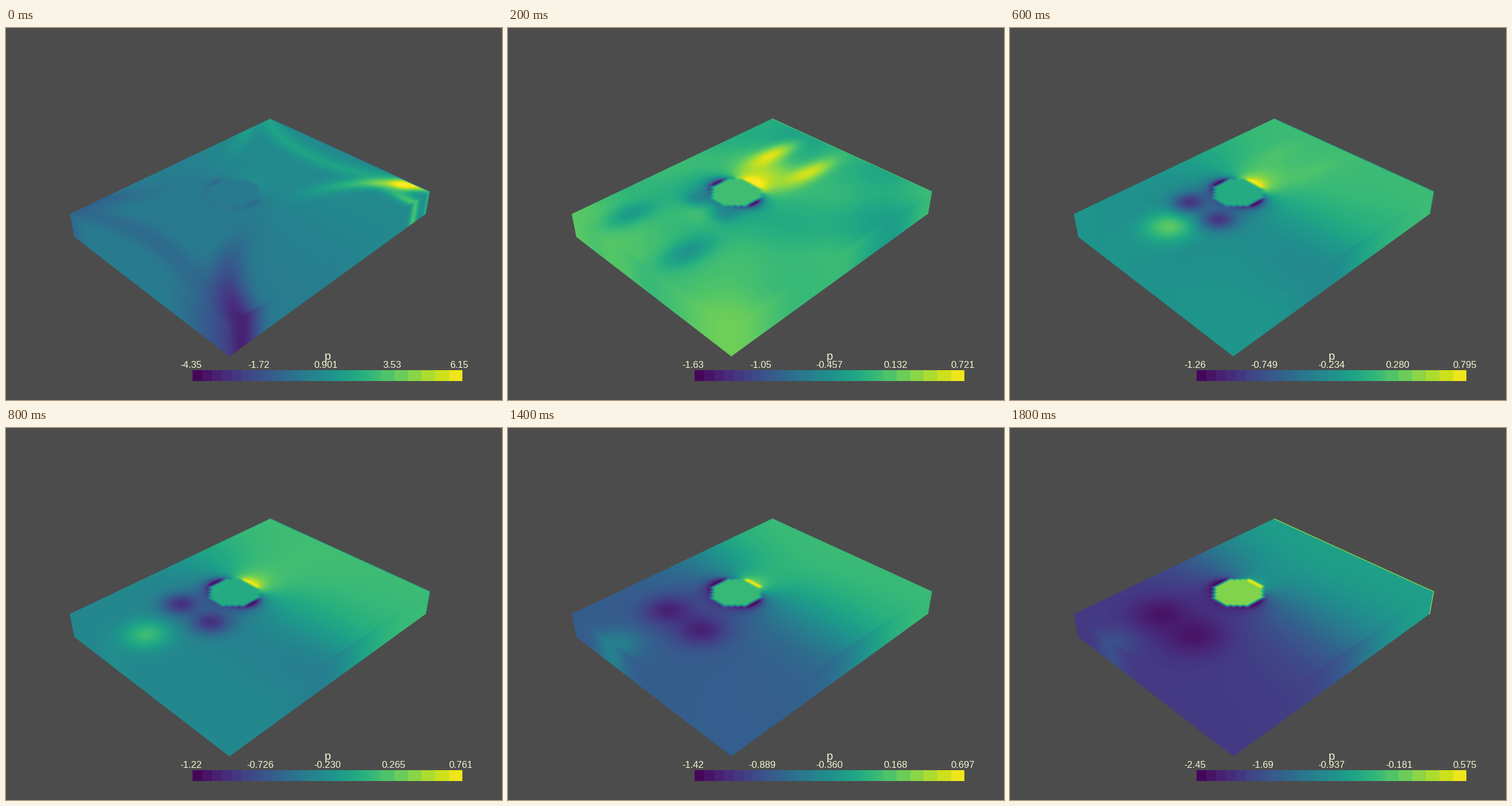
These frames come from a looping animation (864 px wide and 648 px high, 1900 ms). A matplotlib script:

```python
import numpy as np
import matplotlib.pyplot as plt
from matplotlib.animation import FuncAnimation
from matplotlib.patches import Polygon

W, H, FRAMES, STEP = 864, 648, 19, 100
VIRIDIS = plt.get_cmap("viridis")
INK = "#eff8d2"

# Corners of the slab
BACK, RIGHT, LEFT, FRONT = (460, 158), (738, 285), (111, 324), (388, 520)
LEFT_LOW, FRONT_LOW, RIGHT_LOW = (119, 364), (389, 572), (731, 324)
OUTLINE = [BACK, RIGHT, RIGHT_LOW, FRONT_LOW, LEFT_LOW, LEFT]

# Scalar range and mean levels at a few moments (in steps)
KEYS = [0, 2, 4, 6, 10, 14, 18]
LOW = [-4.348, -1.6345, -1.2725, -1.2635, -1.179, -1.4175, -2.449]
HIGH = [6.15, 0.721, 0.822, 0.795, 0.7264, 0.697, 0.575]
INLET = [0.48, 0.60, 0.66, 0.68, 0.69, 0.68, 0.57]
OUTLET = [0.42, 0.69, 0.53, 0.52, 0.42, 0.30, 0.17]

# Mesh on the top face: s runs from inlet to outlet, t across
LENGTH, CELL = 1.3, 0.02
S, T = np.meshgrid(np.arange(66) * CELL, np.arange(51) * CELL, indexing="ij")
CS, CT, R = 0.65, 0.38, 0.12


def homography(p0, p1, p2, p3):
    """Unit square (0,0),(1,0),(1,1),(0,1) to a quadrilateral."""
    p0, p1, p2, p3 = (np.array(p, float) for p in (p0, p1, p2, p3))
    g, h = np.linalg.solve(np.column_stack([p1 - p2, p3 - p2]), p0 - p1 + p2 - p3)
    cols = np.column_stack([p1 * (1 + g) - p0, p3 * (1 + h) - p0, p0])
    return np.vstack([cols, [g, h, 1]])


def unproject(quad, x, y):
    m = np.linalg.inv(homography(*quad))
    u, v, w = (row[0] * x + row[1] * y + row[2] for row in m)
    return u / w, v / w


# Every pixel is traced to its place (a, b) on the top; sides extend the rim
X0, X1, Y0, Y1 = 104, 744, 152, 580
px, py = np.meshgrid(np.arange(X0, X1) + 0.5, np.arange(Y0, Y1) + 0.5)
a, b = unproject((BACK, LEFT, FRONT, RIGHT), px, py)
on_side = (a > 1) | (b > 1)
on_left = on_side & (px < 388.5)
on_right = on_side & ~on_left
sl, _ = unproject((LEFT, FRONT, FRONT_LOW, LEFT_LOW), px, py)
sr, _ = unproject((FRONT, RIGHT, RIGHT_LOW, FRONT_LOW), px, py)
a = np.clip(np.where(on_left, 1, np.where(on_right, 1 - sr, a)), 0, 1)
b = np.clip(np.where(on_right, 1, np.where(on_left, sl, b)), 0, 1)

# Bilinear lookup from mesh nodes to pixels
gi, gj = a * (S.shape[0] - 1), b * (S.shape[1] - 1)
i0 = np.minimum(gi.astype(int), S.shape[0] - 2)
j0 = np.minimum(gj.astype(int), S.shape[1] - 2)
fi, fj = gi - i0, gj - j0


def to_pixels(nodes):
    near = nodes[i0, j0] * (1 - fj) + nodes[i0, j0 + 1] * fj
    far = nodes[i0 + 1, j0] * (1 - fj) + nodes[i0 + 1, j0 + 1] * fj
    return near * (1 - fi) + far * fi


def blob(s, t, ws, wt=None):
    return np.exp(-(((S - s) / ws) ** 2 + ((T - t) / (wt or ws)) ** 2) / 2)


def ring(s, t, radius, width):
    return np.exp(-((np.hypot(S - s, T - t) - radius) / width) ** 2 / 2)


def start_pulse():
    """Wave fronts thrown back by the walls: high upstream, low downstream."""
    x = (CS - S) / CS
    dipole = x * np.abs(x)
    width = 0.028 + 0.03 * S / LENGTH
    return (0.40 * dipole * ring(0.6, 1.29, 0.695, width)
            + 0.20 * dipole * ring(0.65, -0.62, 0.77, width)
            + 0.10 * ring(-0.6, 0.42, 0.745, 0.04)
            - 0.07 * ring(1.9, 0.42, 0.745, 0.05)
            + 0.22 * blob(0.05, 0.89, 0.04)
            + 0.24 * blob(0.13, 1, 0.025, 0.10))


def early_swell():
    """Twin crests ahead of the cylinder, twin troughs behind, slight unrest."""
    rng = np.random.default_rng(4)
    out = 0.14 * blob(0.4, CT, 0.1, 0.12)
    for side in (-1, 1):
        out += 0.27 * blob(0.26, CT + 0.12 * side, 0.11, 0.04)
        out -= 0.16 * blob(1.12, CT - 0.01 + 0.19 * side, 0.09, 0.05)
    for i in range(1, 5):
        for j in range(1, 5):
            wave = np.cos(i * np.pi * S / LENGTH) * np.cos(j * np.pi * T)
            out += 0.008 * rng.normal() * wave
    return out + 0.08 * blob(LENGTH, 0, 0.15) + 0.07 * blob(LENGTH, 0.9, 0.15, 0.3)


def cylinder_flow():
    """High in front, sharp lows on the flanks, a weak wake."""
    ds, dt = CS - S, T - CT
    r = np.maximum(np.hypot(ds, dt), R)
    c, q = ds / r, (R / r) ** 2
    checker = (-1.0) ** np.add.outer(np.arange(S.shape[0]), np.arange(S.shape[1]))
    return (0.42 * np.clip(c, 0, 1) ** 3 * q
            - 0.70 * (dt / r) ** 6 * q ** 3
            - 0.30 * np.clip(0.3 - c, 0, 1) * q
            + 0.015 * checker * q)


PULSE, SWELL, FLOW = start_pulse(), early_swell(), cylinder_flow()
DROP = 1 / (1 + np.exp(9 * (S / LENGTH - 0.38 - 0.08 * T)))
SOLID = np.hypot(S - CS, T - CT) < R
FACE = SOLID & (S < S[SOLID].min() + CELL / 2)


def field_at(step, zero):
    inlet, outlet = np.interp(step, KEYS, INLET), np.interp(step, KEYS, OUTLET)
    v = outlet + (inlet - outlet) * DROP
    v += PULSE * max(0, 1 - step / 2)
    v += SWELL * np.interp(step, [0, 2, 4, 8], [0, 1, 0.2, 0])
    v += FLOW * np.interp(step, [0, 2, 12, 18], [0.15, 1, 0.9, 0.5])
    v -= 0.07 * np.interp(step, [2, 5, 10, 16], [0, 1, 1, 0]) * blob(0.8, 1, 0.15, 0.22)

    # a crest runs ahead to the outlet, the vortex pair drifts after it and grows
    shed = np.clip((step - 1) / 3, 0, 1)
    crest = min(0.59 + 0.037 * step, 1) * LENGTH
    v *= 1 + 0.5 * shed * blob(crest, 0.40 - 0.006 * step, 0.075)
    drift = (0.61 + 0.0098 * step) * LENGTH
    for side in (-1, 1):
        v *= 1 - 0.68 * shed * blob(drift, CT + side * (0.085 + 0.0015 * step),
                                    0.035 + 0.0033 * step)

    v = np.where(SOLID, zero, np.clip(v, 0, 1))
    if step > 0:
        v[FACE] = 1
    return to_pixels(v)


def bar_values():
    """Smooth in the middle, stepped towards both ends."""
    t = (np.arange(470) + 0.5) / 470
    steps = np.where(t < 0.2, 0.036, np.where(t > 0.7, 0.05, 1 / 470))
    return ((np.floor(t / steps) + 0.5) * steps)[None, :]


fig = plt.figure(figsize=(W / 100, H / 100), dpi=100, facecolor="#4c4c4c")
ax = fig.add_axes([0, 0, 1, 1])
ax.axis("off")
style = dict(cmap=VIRIDIS, vmin=0, vmax=1, interpolation="nearest", aspect="auto")
slab = ax.imshow(np.zeros(a.shape), extent=(X0, X1, Y1, Y0), **style)
slab.set_clip_path(Polygon(OUTLINE, transform=ax.transData))
ax.imshow(bar_values(), extent=(325, 795, 615, 596), **style)
ax.set_xlim(0, W)
ax.set_ylim(H, 0)
inlet_edge, = ax.plot(*zip(BACK, RIGHT, RIGHT_LOW), lw=1.0, solid_joinstyle="round")


def write(x, y, text, size):
    return ax.text(x, y, text, size=size, color=INK, family="Liberation Sans",
                   ha="center", va="baseline")


write(560.5, 578, "p", 14.5)
labels = [write(0, 591.5, "", 12) for _ in range(5)]


def draw(step):
    low, high = np.interp(step, KEYS, LOW), np.interp(step, KEYS, HIGH)
    zero = -low / (high - low)
    slab.set_data(field_at(step, zero))
    inlet_edge.set_color(VIRIDIS(zero))
    for k, label in enumerate(labels):
        text = f"{low + (high - low) * k / 4:#.3g}"
        label.set_text(text)
        # short numbers are padded on the right, so they sit further left
        label.set_x(325 + 117.5 * k - 2.75 * (6 - len(text)))
    return [slab, inlet_edge, *labels]


anim = FuncAnimation(fig, draw, frames=FRAMES, interval=STEP, repeat=True,
                     repeat_delay=0, blit=False)
plt.show()
```
